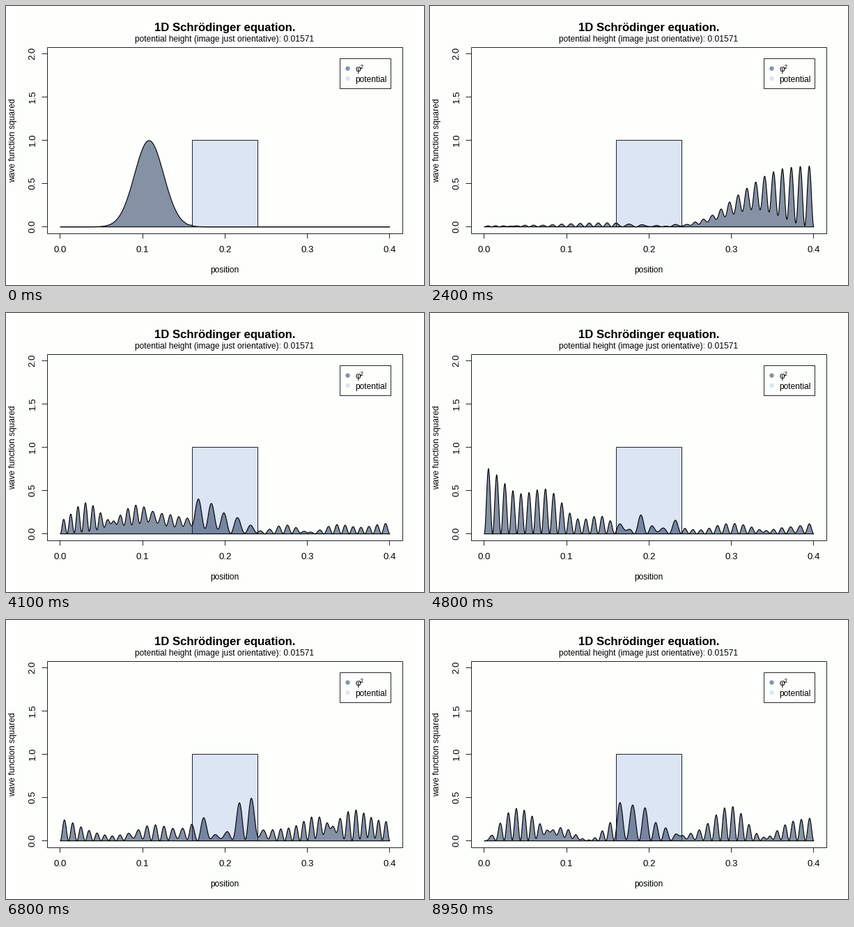
Recreate the animation shown at these times as a matplotlib script. Size 600x400 px, loop 9000 ms.

```python
import numpy as np
import matplotlib.pyplot as plt
from matplotlib.animation import FuncAnimation
from matplotlib.patches import Circle, Rectangle

W, H, DPI = 600, 400, 100
FRAMES, INTERVAL = 180, 50
PX = 72 / DPI                       # points per pixel

# Schroedinger equation on a fine grid: closed box with a square barrier
N, CYCLES, LAMBDA = 4000, 20, 0.5
STEPS = 5                           # time steps per frame
MODES = 240
K0 = 2 * np.pi * CYCLES / N
DT = 1 / (4 * K0 ** 2)

site = np.arange(N + 1)
barrier = np.where((site >= 2 * N / 5) & (site <= 3 * N / 5), LAMBDA * K0 ** 2, 0)
packet = np.exp(1j * K0 * site - 8 * (4 * site - N) ** 2 / N ** 2)

# Standing waves of the empty box serve as the basis
wavenum = np.pi * np.arange(1, MODES + 1) / N
sines = np.sqrt(2 / N) * np.sin(np.outer(site, wavenum))
kinetic = np.diag(2 - 2 * np.cos(wavenum))
energy, mix = np.linalg.eigh(kinetic + sines.T @ (barrier[:, None] * sines))
modes = sines @ mix
weight = modes.T @ packet
phase = 2 * np.arctan(energy * DT / 2)   # Crank-Nicolson phase per step

shown = site[::5]
modes = modes[::5]


def density(step):
    return np.abs(modes @ (weight * np.exp(-1j * phase * step))) ** 2


# Plot region in pixels, data ranges padded by 4 %
LEFT, RIGHT, TOP, BOTTOM = 59.04, 569.76, 59.04, 326.56


def px(x):
    return LEFT + (RIGHT - LEFT) * (x + 0.016) / 0.432


def py(y):
    return BOTTOM - (BOTTOM - TOP) * (y + 0.08) / 2.16


def crisp(v):
    return np.floor(v) + 0.5


plt.rcParams["font.family"] = "Liberation Sans"
plt.rcParams["path.snap"] = False
INK = "black"
BACK = "#fdfffd"
WAVE = (15 / 255, 39 / 255, 81 / 255, 0.5)
WALL = "#dce5f4"
THIN = 0.85 * PX

fig = plt.figure(figsize=(W / DPI, H / DPI), dpi=DPI, facecolor=BACK)
ax = fig.add_axes([0, 0, 1, 1])
ax.set_xlim(0, W)
ax.set_ylim(H, 0)
ax.axis("off")


def text(x, y, s, size=12, ha="center", **kw):
    ax.text(x, y, s, fontsize=size * PX, ha=ha, va="baseline", color=INK, **kw)


def line(xs, ys):
    ax.plot(crisp(xs), crisp(ys), color=INK, lw=THIN, solid_capstyle="butt",
            zorder=3)


def box(x0, y0, x1, y1, fill="none", z=3):
    x0, y0, x1, y1 = crisp([x0, y0, x1, y1])
    ax.add_patch(Rectangle((x0, y0), x1 - x0, y1 - y0, fc=fill, ec=INK,
                           lw=THIN, zorder=z))


def dot(x, y, color):
    ax.add_patch(Circle((x, y), 3.2, fc=color, ec="none", zorder=5))


mid = (LEFT + RIGHT) / 2 - 0.4
text(mid, 36, "1D Schrödinger equation.", 16.8, weight="bold")
text(mid, 51, "potential height (image just orientative): 0.01571")
text(mid, 381.8, "position")
text(13, (TOP + BOTTOM) / 2, "wave function squared", rotation=90,
     rotation_mode="anchor")

box(LEFT, TOP, RIGHT, BOTTOM)
for i in range(5):
    x, y = px(i / 10), py(i / 2)
    line([x, x], [BOTTOM, BOTTOM + 7.2])
    text(x, 353, f"{i / 10:.1f}", 13.2)
    line([LEFT - 7.2, LEFT], [y, y])
    text(41.8, y - 1, f"{i / 2:.1f}", 13.2, rotation=90, rotation_mode="anchor")

box(px(0.16), py(1), px(0.24), py(0), WALL, 1)

box(479.5, 75, 552, 118, BACK, 4)
dot(490.5, 89.6, "#8793a8")
dot(490.5, 104, WALL)
text(501, 94, "φ²", ha="left", zorder=5)
text(501, 108.6, "potential", ha="left", zorder=5)

xs = px(0.4 * shown / N)
wave, = ax.fill(xs, np.full(len(xs), py(0)), fc=WAVE, ec=INK, lw=1.15 * PX,
                joinstyle="round", zorder=2)


def draw(i):
    wave.set_xy(np.column_stack((xs, py(density(STEPS * (i + 1))))))
    return wave,


anim = FuncAnimation(fig, draw, frames=FRAMES, interval=INTERVAL,
                     init_func=lambda: draw(0), repeat=True, blit=False)
plt.show()
```
